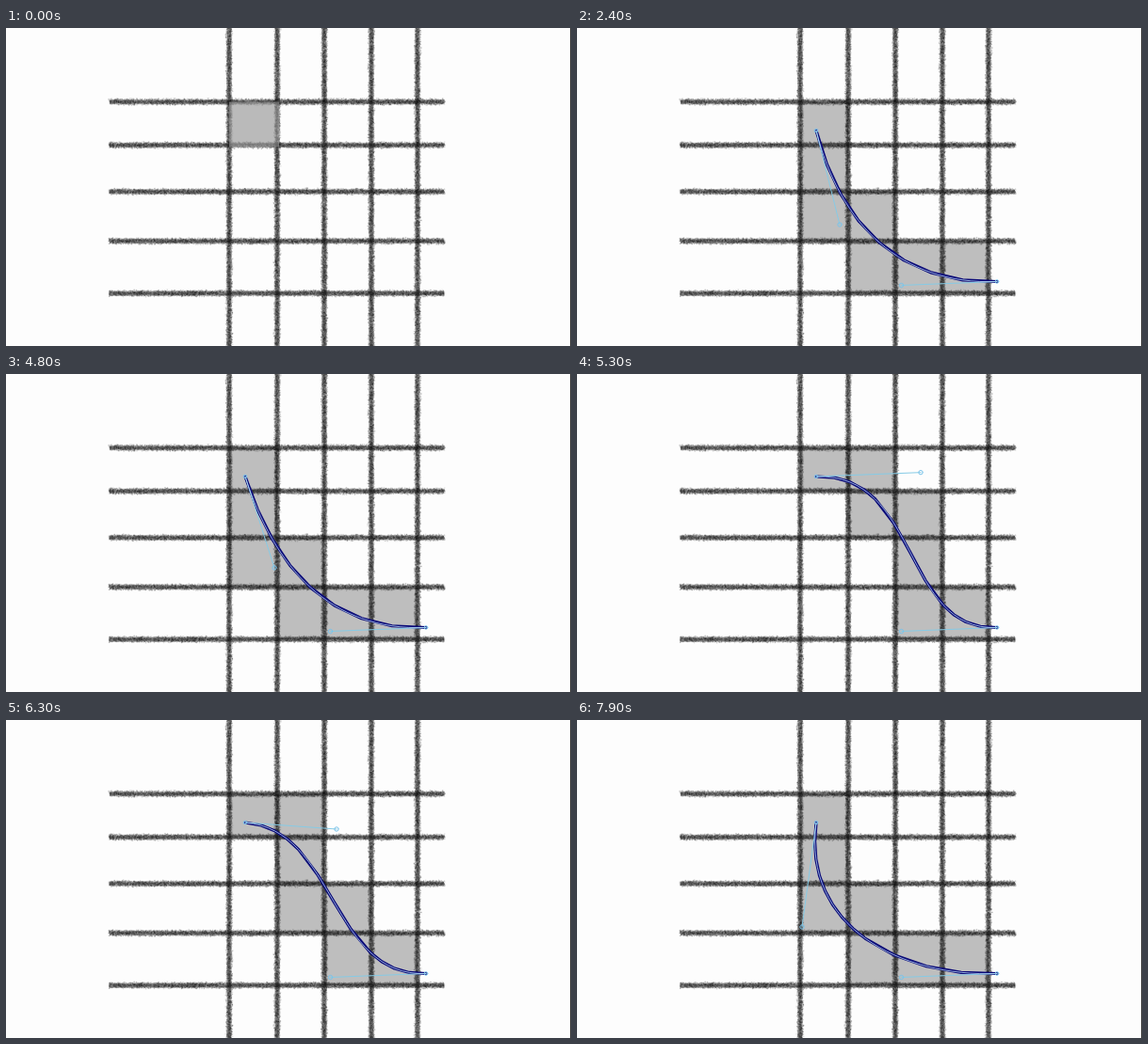
An HTML page with a canvas that plays this animation: 600x338 px, repeating every 8000 ms.

```html
<!DOCTYPE html>
<html lang="en">
<head>
<meta charset="utf-8">
<title>Curve on a pixel grid</title>
<style>
html, body { margin: 0; width: 100%; height: 100%; overflow: hidden; background: #fdfdfd; }
canvas { display: block; width: 600px; height: 338px; }
</style>
</head>
<body>
<canvas id="stage" width="600" height="338"></canvas>
<script>
const W = 600, H = 338, LOOP = 8000, STEP = 100;
const COLS = [237, 288, 338, 388, 437];
const ROWS = [78.5, 124.5, 174, 226.5, 282];
const START = [254, 109], END = [446, 269.5], HANDLE2 = [344.5, 273.5];
const TOLERANCE = 1;
const FILL_STEP = 130, DRAW_FROM = 880, DRAW_TO = 1300, EDIT_FROM = 2300;

// time, x, y of the dragged handle
const DRAG = [
  [4500, 279, 209], [4800, 285, 206], [5100, 325, 160], [5400, 385, 77],
  [5600, 434, 42], [5700, 443, 36], [5800, 452, 46], [6000, 420, 78],
  [6300, 351, 116], [6700, 243, 214], [6900, 260, 195], [7200, 375, 84],
  [7400, 438, 45], [7600, 360, 112], [7900, 239, 220]
];

const ctx = document.getElementById('stage').getContext('2d');

function random(seed) {
  return () => {
    seed = (seed * 1664525 + 1013904223) >>> 0;
    return seed / 4294967296;
  };
}

function makeGrid() {
  const layer = document.createElement('canvas');
  layer.width = W;
  layer.height = H;
  const g = layer.getContext('2d');
  const rnd = random(7);

  function charcoal(from, to, center, vertical) {
    const rect = (a, b, la, lb) =>
      vertical ? g.fillRect(b, a, lb, la) : g.fillRect(a, b, la, lb);
    const band = (width, alpha) => {
      g.fillStyle = `rgba(35,35,35,${alpha})`;
      rect(from + 1, center - width / 2, to - from - 2, width);
    };
    band(5.5, 0.25);
    band(3.5, 0.3);
    for (let i = 0; i < (to - from) * 12; i++) {
      const along = from + rnd() * (to - from);
      const off = (rnd() + rnd() - 1) * 4;
      g.fillStyle = `rgba(25,25,25,${0.1 + rnd() * 0.16})`;
      rect(along - 0.6, center + off - 0.6, 1.2, 1.2);
    }
  }

  ROWS.forEach(y => charcoal(109, 466, y, false));
  COLS.forEach(x => charcoal(-2, H + 2, x, true));
  return layer;
}

const grid = makeGrid();

function handleAt(t) {
  if (t <= DRAG[0][0]) return DRAG[0].slice(1);
  const i = DRAG.findIndex(k => k[0] >= t);
  if (i < 0) return DRAG[DRAG.length - 1].slice(1);
  const [t0, x0, y0] = DRAG[i - 1], [t1, x1, y1] = DRAG[i];
  const p = (t - t0) / (t1 - t0);
  return [x0 + (x1 - x0) * p, y0 + (y1 - y0) * p];
}

function bezier(handle, u) {
  const v = 1 - u;
  return [0, 1].map(k =>
    v * v * v * START[k] + 3 * v * v * u * handle[k] +
    3 * v * u * u * HANDLE2[k] + u * u * u * END[k]);
}

// Chord ends between u0 and u1, split until each chord lies close to the curve
function flatten(handle, u0, u1) {
  const mid = (u0 + u1) / 2;
  const [a, m, b] = [u0, mid, u1].map(u => bezier(handle, u));
  const gap = Math.hypot(m[0] - (a[0] + b[0]) / 2, m[1] - (a[1] + b[1]) / 2);
  if (gap < TOLERANCE || u1 - u0 < 0.01) return [b];
  return [...flatten(handle, u0, mid), ...flatten(handle, mid, u1)];
}

// Cells touched by the curve, in drawing order
function coveredCells(handle) {
  const seen = new Set(), cells = [];
  for (let i = 0; i <= 400; i++) {
    const [x, y] = bezier(handle, i / 400);
    const c = COLS.findIndex((v, k) => x >= v && x < COLS[k + 1]);
    const r = ROWS.findIndex((v, k) => y >= v && y < ROWS[k + 1]);
    const key = c + ',' + r;
    if (c < 0 || r < 0 || seen.has(key)) continue;
    seen.add(key);
    cells.push([c, r]);
  }
  return cells;
}

function fillCell([c, r], color, spread) {
  ctx.fillStyle = color;
  ctx.fillRect(COLS[c], ROWS[r], COLS[c + 1] - COLS[c] + spread, ROWS[r + 1] - ROWS[r] + spread);
}

function strokePath(color, width, build) {
  ctx.strokeStyle = color;
  ctx.lineWidth = width;
  ctx.beginPath();
  build();
  ctx.stroke();
}

function ring([x, y], radius) {
  strokePath('#7cc4ea', 1, () => ctx.arc(x, y, radius, 0, Math.PI * 2));
}

function drawCurve(handle, progress) {
  strokePath('#0b0a78', 3.2, () => {
    ctx.moveTo(...START);
    flatten(handle, 0, progress).forEach(p => ctx.lineTo(...p));
  });
}

function drawEditor(handle) {
  strokePath('#86cbe6', 1, () => {
    ctx.moveTo(...START);
    ctx.lineTo(...handle);
    ctx.moveTo(...END);
    ctx.lineTo(...HANDLE2);
  });
  strokePath('rgba(190,222,248,.85)', 0.9, () => {
    ctx.moveTo(...START);
    ctx.bezierCurveTo(...handle, ...HANDLE2, ...END);
  });
  [START, END].forEach(p => ring(p, 1.8));
  [handle, HANDLE2].forEach(p => ring(p, 2.2));
}

function render(t) {
  const handle = handleAt(t);
  const cells = coveredCells(handle);
  const count = Math.min(cells.length, t < 1000 ? 1 + Math.floor(t / FILL_STEP) : cells.length);

  ctx.fillStyle = '#fdfdfd';
  ctx.fillRect(0, 0, W, H);
  cells.slice(0, count).forEach(cell => fillCell(cell, '#bebebe', 0));
  ctx.drawImage(grid, 0, 0);
  if (t < FILL_STEP * cells.length) fillCell(cells[count - 1], 'rgba(184,184,184,.5)', 2);

  ctx.fillStyle = '#444';
  ctx.fillRect(599, 0, 1, H);

  ctx.lineCap = ctx.lineJoin = 'round';
  if (t >= DRAW_FROM) drawCurve(handle, Math.min(1, (t - DRAW_FROM) / (DRAW_TO - DRAW_FROM)));
  if (t >= EDIT_FROM) drawEditor(handle);
}

const begin = performance.now();

function tick(now) {
  const t = Math.max(0, now - begin) % LOOP;
  render(Math.floor(t / STEP) * STEP);
  requestAnimationFrame(tick);
}

render(0);
requestAnimationFrame(tick);
</script>
</body>
</html>
```
